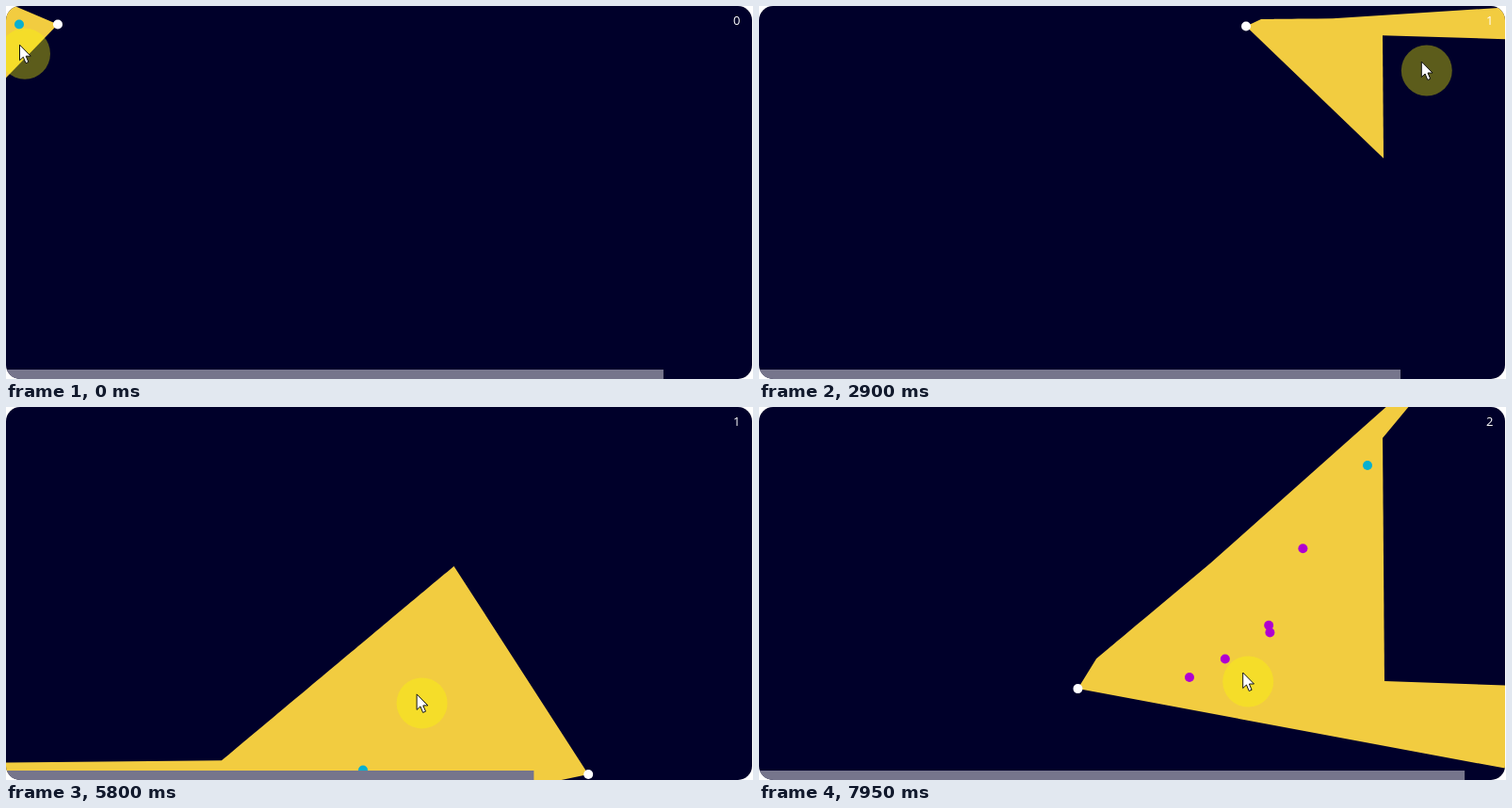
Animation, 793 px wide and 396 px high, one loop 8000 ms. Source, as an HTML page:

```html
<!DOCTYPE html>
<html lang="en">
<head>
<meta charset="utf-8">
<title>Searchlight</title>
<style>
  html, body { margin: 0; width: 100%; height: 100%; overflow: hidden; background: #fff; }
  svg { display: block; }
  text { font: 13px "Open Sans", "Noto Sans", sans-serif; fill: #fff; text-anchor: end; }
</style>
</head>
<body>
<svg width="793" height="396" viewBox="0 0 793 396">
  <defs>
    <clipPath id="stage"><rect width="792" height="396" rx="15"/></clipPath>
    <clipPath id="lit"><polygon id="litShape"/></clipPath>
  </defs>
  <g clip-path="url(#stage)">
    <rect width="792" height="396" fill="#00002a"/>
    <polygon id="light" fill="#f2cc40"/>
    <g clip-path="url(#lit)">
      <circle id="goal" r="5" fill="#08b0d0"/>
      <g id="foes" fill="#b000d0"></g>
    </g>
    <circle id="player" r="5" fill="#fff"/>
    <rect id="bar" y="386" height="10" fill="#76758c"/>
    <text id="score" x="779.5" y="20"></text>
    <g id="mouse">
      <circle cx="5.5" cy="9.5" r="27" fill="#f9f900" fill-opacity=".37"/>
      <path d="M0 0V16.5L3.8 13 6.5 19.5 9.4 18.3 6.7 12H11.8Z" fill="#fff" stroke="#111"/>
    </g>
  </g>
</svg>
<script>
const LOOP = 8000, W = 792, H = 396;
const SPAN = 69;       // cone width in degrees, one ray per degree
const LEAD = 40;       // ms by which the pointer runs ahead of the cone
const DRAIN = 0.0416;  // bar pixels lost per ms
const $ = id => document.getElementById(id);
const clamp = (v, lo, hi) => Math.min(hi, Math.max(lo, v));

// Hidden walls and the stage edges: x1, y1, x2, y2
const walls = [
  [535, 119.2, 228, 376], [340, 16, 629, 13], [363, 188, 180, 224], [662, 30, 664, 295],
  [0, 0, W, 0], [W, 0, W, H], [W, H, 0, H], [0, H, 0, 0]
];

// Key presses: from, to, and the distance covered in x and y
const home = [55, 19.5];
const presses = [
  [80, 230, -31, 0], [520, 4200, 762, 0], [500, 1180, 0, 140.5], [1900, 2570, 0, -138.5],
  [3783, 4250, 0, 96.5], [4496, 5800, 0, 272], [4984, 7163, -447.5, 0], [7510, 8000, 0, -101]
];

// Cone: time, degrees, degrees per ms, pointer distance
const sweep = [
  [0, 169, -0.42, 46], [1400, -10.2, 0.04, 450], [2900, 9.3, 0.05, 190],
  [4150, 154.4, -0.23, 178], [4400, 145, 0, 180], [5800, 202.6, 0.06, 201],
  [7100, 327.6, 0.125, 156], [7950, 695.6, 0.46, 176]
];

// Rounds: start, bar width, goal x, goal y
const rounds = [[0, 698, 14, 19.5], [233, W, 379, 385.5], [6920, W, 646, 62]];

// Foes at 7100 ms, with their pace in px per ms; all head for the lair
const lair = [338, 337];
const foes = [
  [603.3, 130, 0.0386], [581.3, 211, 0.0531], [578.8, 222, 0.0474],
  [539.8, 247.5, 0.0578], [505.3, 266.7, 0.0616]
];

const foeDots = foes.map(() => {
  const dot = document.createElementNS("http://www.w3.org/2000/svg", "circle");
  dot.setAttribute("r", 5);
  return $("foes").appendChild(dot);
});

function playerAt(t) {
  let [x, y] = home;
  for (const [from, to, dx, dy] of presses) {
    const u = clamp((t - from) / (to - from), 0, 1);
    x += dx * u;
    y += dy * u;
  }
  return [x, y];
}

// Cubic Hermite for the angle, smoothstep for the distance
function coneAt(t) {
  let i = 0;
  while (i < sweep.length - 2 && t >= sweep[i + 1][0]) i++;
  const [t0, a0, s0, r0] = sweep[i], [t1, a1, s1, r1] = sweep[i + 1];
  const d = t1 - t0, u = (t - t0) / d, v = 1 - u, ease = u * u * (3 - 2 * u);
  return {
    angle: a0 + (a1 - a0) * ease + d * u * v * (s0 * v - s1 * u),
    reach: r0 + (r1 - r0) * ease
  };
}

const unit = deg => [Math.cos(deg * Math.PI / 180), Math.sin(deg * Math.PI / 180)];

function cast(x, y, deg) {
  const [dx, dy] = unit(deg);
  let best = 1000;
  for (const [x1, y1, x2, y2] of walls) {
    const ex = x2 - x1, ey = y2 - y1, det = dx * ey - dy * ex;
    if (Math.abs(det) < 1e-9) continue;
    const dist = ((x1 - x) * ey - (y1 - y) * ex) / det;
    const along = ((x1 - x) * dy - (y1 - y) * dx) / det;
    if (dist > 0 && dist < best && along >= 0 && along <= 1) best = dist;
  }
  return [x + dx * best, y + dy * best];
}

function place(dot, x, y) {
  dot.setAttribute("cx", x);
  dot.setAttribute("cy", y);
}

function draw(t) {
  const [x, y] = playerAt(t);
  const { angle, reach } = coneAt(t);
  const score = rounds.findLastIndex(r => t >= r[0]);
  const [start, full, gx, gy] = rounds[score];

  const shape = [[x, y]];
  for (let i = 0; i <= SPAN; i++) shape.push(cast(x, y, angle - SPAN / 2 + i));
  const points = shape.map(p => p.map(v => v.toFixed(1)).join()).join(" ");
  $("light").setAttribute("points", points);
  $("litShape").setAttribute("points", points);

  place($("player"), x, y);
  place($("goal"), gx, gy);
  foes.forEach(([fx, fy, pace], i) => {
    const dx = lair[0] - fx, dy = lair[1] - fy;
    const u = pace * (t - 7100) / Math.hypot(dx, dy);
    place(foeDots[i], fx + dx * u, fy + dy * u);
  });
  $("foes").style.display = score === 2 ? "" : "none";
  $("bar").setAttribute("width", full - DRAIN * (t - start));
  $("score").textContent = score;

  const [ux, uy] = unit(angle + LEAD * (coneAt(t + 1).angle - angle));
  const mx = clamp(x + ux * reach, 0, W - 12), my = clamp(y + uy * reach, 0, H - 6);
  $("mouse").setAttribute("transform", `translate(${mx.toFixed(1)} ${my.toFixed(1)})`);
}

const begin = performance.now();
function tick() {
  draw((performance.now() - begin) % LOOP);
  requestAnimationFrame(tick);
}
tick();
</script>
</body>
</html>
```
